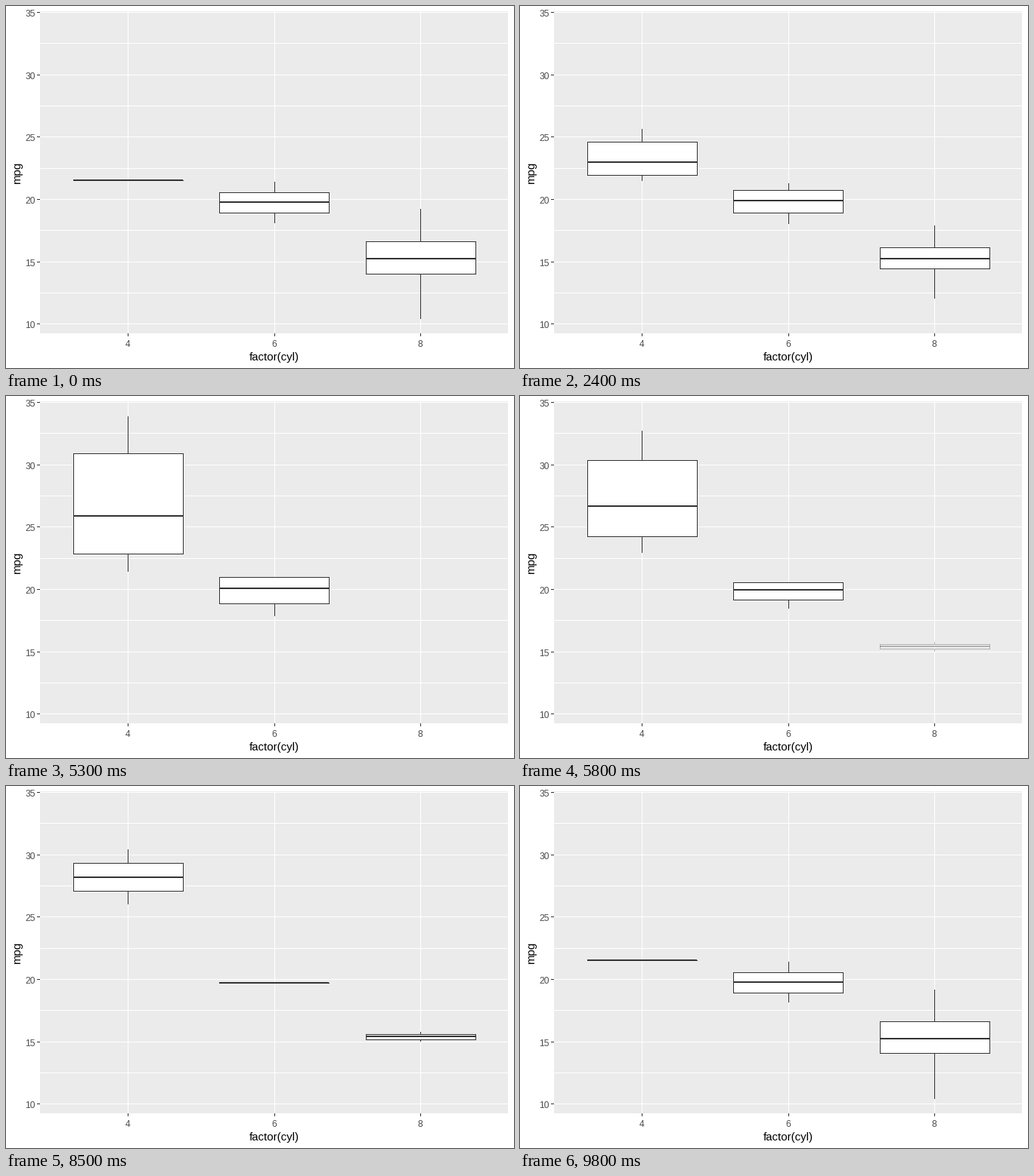
A matplotlib script for the animation above (10000 ms loop, 672 by 480 pixels).

```python
import math

import matplotlib.pyplot as plt
import numpy as np
from matplotlib.animation import FuncAnimation
from matplotlib.patches import Rectangle

W, H = 672, 480
LEFT, TOP, RIGHT, BOTTOM = 45, 7, 664, 434
UNIT_X, UNIT_Y = 193.49, 16.5362      # pixels per category and per mpg
INK, LABEL, PANEL = "#333333", "#4D4D4D", "#EBEBEB"

# mpg by number of gears, then by number of cylinders
MPG = {
    3: {4: [21.5],
        6: [21.4, 18.1],
        8: [18.7, 14.3, 16.4, 17.3, 15.2, 10.4, 10.4, 14.7, 15.5, 15.2, 13.3, 19.2]},
    4: {4: [22.8, 24.4, 22.8, 32.4, 30.4, 33.9, 27.3, 21.4],
        6: [21.0, 21.0, 19.2, 17.8]},
    5: {4: [26.0, 30.4],
        6: [19.7],
        8: [15.8, 15.0]},
}
CYLS = (4, 6, 8)
# first frame, last frame, gears before, gears after
MOVES = ((16, 33, 3, 4), (50, 67, 4, 5), (84, 100, 5, 3))


def x_px(pos):
    return math.floor(45.5 + (pos - 0.4) * UNIT_X)


def y_px(mpg):
    return math.floor(22 / 3 + (35.075 - mpg) * UNIT_Y)


def summary(values):
    """Minimum, lower hinge, median, upper hinge, maximum."""
    return np.percentile(values, [0, 25, 50, 75, 100])


STATS = {gear: {cyl: summary(v) for cyl, v in group.items()}
         for gear, group in MPG.items()}


def ease(u):
    """Exponential in-out."""
    if u <= 0 or u >= 1:
        return min(max(u, 0.0), 1.0)
    if u < 0.5:
        return 0.5 * 2 ** (20 * u - 10)
    return 1 - 0.5 * 2 ** (10 - 20 * u)


def pose(cyl, frame):
    """Five-number summary and opacity of one box."""
    gear = 3
    for start, end, before, after in MOVES:
        if frame < start:
            break
        gear = after
        if frame < end:
            p = ease((frame - start) / (end - start))
            a, b = STATS[before].get(cyl), STATS[after].get(cyl)
            if b is None:                       # shrink to the median
                return a + (a[2] - a) * p, 1
            if a is None:                       # fade in
                return b, p
            return a + (b - a) * p, 1
    stats = STATS[gear].get(cyl)
    return (stats, 1) if stats is not None else (None, 0)


fig = plt.figure(figsize=(7, 5), dpi=96, facecolor="white")
ax = fig.add_axes([0, 0, 1, 1])
ax.set(xlim=(0, W), ylim=(H, 0))
ax.axis("off")


def rect(x, y, w, h, color, z=1):
    patch = Rectangle((x, y), w, h, facecolor=color, linewidth=0,
                      antialiased=False, snap=False, zorder=z)
    return ax.add_patch(patch)


def label(x, y, text, px, color, **kw):
    ax.text(x, y, text, fontsize=px * 0.75, color=color,
            family="Liberation Sans", va="baseline", **kw)


class Box:
    def __init__(self, pos):
        self.x0, self.xc, self.x1 = (x_px(pos + d) for d in (-0.375, 0, 0.375))
        self.fill = rect(0, 0, 0, 0, "white", 3)
        self.lines = [rect(0, 0, 0, 0, INK, 4) for _ in range(7)]

    def update(self, stats, alpha):
        parts = [self.fill] + self.lines
        for part in parts:
            part.set_visible(alpha > 0)
            part.set_alpha(alpha)
        if alpha == 0:
            return
        low, q1, mid, q3, high = (y_px(v) for v in stats)
        x0, x1, w, h = self.x0, self.x1, self.x1 - self.x0, q1 - q3
        bounds = [
            (x0, q3, w, h),                       # fill
            (self.xc, high, 1, q3 - high),        # whiskers
            (self.xc, q1 + 1, 1, max(0, low - q1 - 1)),
            (x0, q3, w + 1, 1 if h else 0),       # outline
            (x0, q1, w + 1, 1),
            (x0, q3 + 1, 1, max(0, h - 1)),
            (x1, q3 + 1, 1, max(0, h - 1)),
            (x0, mid - 1, w, 2),                  # median
        ]
        for part, b in zip(parts, bounds):
            part.set_bounds(*b)


rect(LEFT, TOP, RIGHT - LEFT, BOTTOM - TOP, PANEL)
for mpg in np.arange(10, 35.1, 2.5):
    y = y_px(mpg)
    rect(LEFT, y, RIGHT - LEFT, 1, "white", 2)
    if mpg % 5 == 0:
        rect(LEFT - 4, y, 4, 1, INK)
        label(39, y + 6, f"{mpg:.0f}", 12, LABEL, ha="right")
for pos, cyl in enumerate(CYLS, 1):
    x = x_px(pos)
    rect(x, TOP, 1, BOTTOM - TOP, "white", 2)
    rect(x, BOTTOM, 1, 4, INK)
    label(x, 452, str(cyl), 12, LABEL, ha="center")
label(354.7, 470, "factor(cyl)", 15, "black", ha="center")
label(19, 221, "mpg", 15, "black", ha="center", rotation=90,
      rotation_mode="anchor")

boxes = {cyl: Box(pos) for pos, cyl in enumerate(CYLS, 1)}


def draw(frame):
    for cyl, box in boxes.items():
        box.update(*pose(cyl, frame))
    return []


anim = FuncAnimation(fig, draw, frames=100, interval=100, repeat=True,
                     repeat_delay=0, init_func=lambda: draw(0))
plt.show()
```
